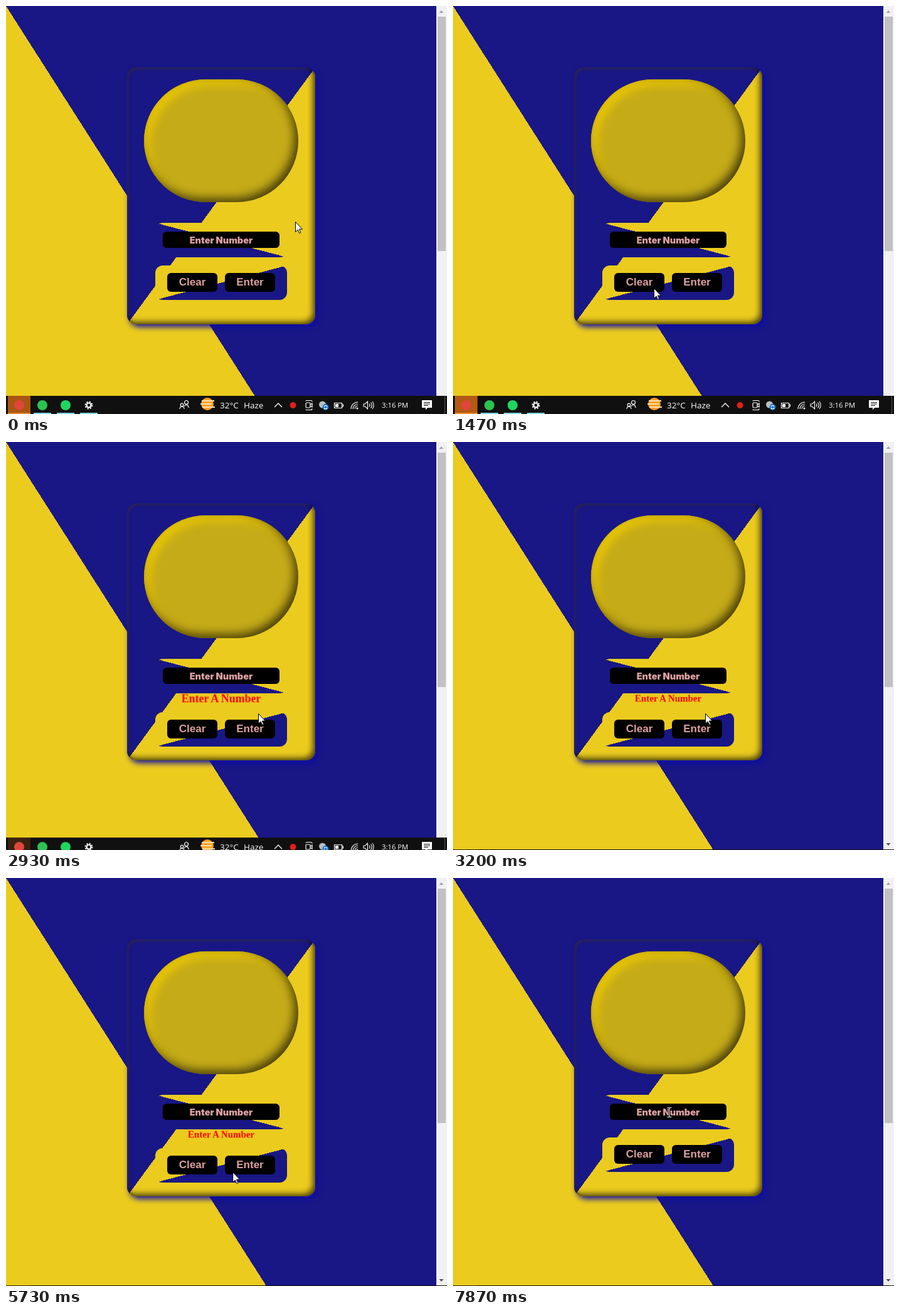
These frames come from a looping animation (703 by 651 pixels, 8000 ms). An HTML page:

```html
<!DOCTYPE html>
<html lang="en">
<head>
<meta charset="utf-8">
<title>Enter Number</title>
<style>
:root { --blue: #191785; --gold: #ebcb1e; --pink: #dda0a0; }
html, body { margin: 0; width: 100%; height: 100%; overflow: hidden; }
body * { position: absolute; box-sizing: border-box; }
svg * { position: static; }
svg { overflow: visible; }
.stage { left: 0; top: 0; width: 703px; height: 651px; overflow: hidden; background: #f1f1f1; }
.page { width: 686px; height: 1076px; background: linear-gradient(to top right, var(--gold) 50%, var(--blue) 50%); }
.thumb { left: 688px; top: 17px; width: 13px; height: 374px; background: #c1c1c1; }
.card {
  left: 193px; top: 98px; width: 300px; height: 410px; border-radius: 15px;
  background: linear-gradient(to bottom right, var(--blue) 50%, var(--gold) 50%);
  box-shadow: 4px 4px 10px #0c0ca8, inset -4px -4px 10px rgba(0, 0, 0, .65), inset 2px 2px 5px rgba(60, 52, 60, .7);
}
.screen {
  left: 27px; top: 19px; width: 246px; height: 196px; border-radius: 98px; background: #c5ab18;
  box-shadow: inset -6px -6px 15px rgba(0, 0, 0, .65), inset 8px 8px 15px #efcb04;
}
.row { left: 45px; width: 210px; height: 55px; border-radius: 12px; }
.entry { top: 248px; background: linear-gradient(to bottom left, var(--gold) 50%, var(--blue) 50%); }
.keys { top: 316px; background: linear-gradient(to bottom right, var(--gold) 50%, var(--blue) 50%); animation: push 8s step-end infinite; }
.box {
  top: 12px; width: 80px; height: 30px; border-radius: 6px; background: #000; color: var(--pink);
  font: bold 17px/29px "Liberation Sans", Arial, sans-serif; text-align: center; white-space: nowrap;
}
.field { left: 12px; top: 14px; width: 186px; height: 26px; font: 900 14.5px/27px Inter, "Liberation Sans", sans-serif; }
.caret { left: 151px; top: 265px; width: 2px; height: 20px; background: var(--pink); animation: blink 8s step-end infinite; }
.error {
  left: 50px; top: 303px; width: 200px; height: 17px; color: #f00; text-align: center;
  font: bold 15px/17px "Liberation Serif", "Times New Roman", serif;
  animation: show 8s step-end infinite, pulse 8s ease-in-out infinite;
}
.bar { left: 0; top: 622px; width: 703px; height: 40px; background: #101010; animation: slide 8s linear infinite; }
.alert { animation: glow 8s linear infinite; }
.mouse { left: 0; top: 0; width: 1px; height: 1px; animation: move 8s linear infinite; }
.arrow { animation: arrow 8s step-end infinite; }
.beam { animation: beam 8s step-end infinite; }

@keyframes push { 0%, 79.95% { transform: none; } 24.875% { transform: translateY(17px); } }
@keyframes show { 0%, 79.95% { opacity: 0; } 24.875% { opacity: 1; } }
@keyframes pulse {
  0%, 24.875%, 32.375%, 39.875%, 100% { transform: scale(1); }
  28.625%, 36.125% { transform: scale(1.2); }
}
@keyframes blink { 0%, 98.3% { opacity: 0; } 91.6% { opacity: 1; } }
@keyframes slide { 0%, 35% { transform: none; } 40%, 100% { transform: translateY(28px); } }
@keyframes glow {
  0% { opacity: .95; } 9% { opacity: .7; } 17%, 21% { opacity: 1; }
  31% { opacity: .65; } 36.6%, 100% { opacity: .25; }
}
@keyframes move {
  0%, .9% { transform: translate(461px, 344px); }
  10.9% { transform: translate(397px, 396px); }
  18.3%, 19.5% { transform: translate(320px, 450px); }
  24.5%, 55.8% { transform: translate(402px, 433px); }
  56.6% { transform: translate(386px, 438px); }
  61.6%, 71% { transform: translate(379px, 469px); }
  72.5%, 74.5% { transform: translate(337px, 469px); }
  77.5%, 80.2% { transform: translate(310px, 469px); }
  88.4%, 100% { transform: translate(345px, 374px); }
}
@keyframes arrow { 0% { opacity: 1; } 87.4%, 100% { opacity: 0; } }
@keyframes beam { 0% { opacity: 0; } 87.4%, 100% { opacity: 1; } }
</style>
</head>
<body>
<div class="stage">
  <div class="page"></div>
  <div class="thumb"></div>
  <svg width="703" height="651">
    <path d="M690.5 11h7l-3.500-4z" fill="#a3a3a3"/>
    <path d="M690.500 640h7l-3.500 4z" fill="#505050"/>
  </svg>

  <div class="card">
    <div class="screen"></div>
    <div class="row entry"><div class="box field">Enter Number</div></div>
    <div class="caret"></div>
    <div class="error">Enter A Number</div>
    <div class="row keys">
      <div class="box" style="left:19px">Clear</div>
      <div class="box" style="left:111px">Enter</div>
    </div>
  </div>

  <div class="bar">
    <svg width="703" height="40" fill="none" stroke="#fff" stroke-width="1.2">
      <g class="alert" stroke="none">
        <path d="M3 0h36v29H3z" fill="#b35a14"/>
        <path d="M3 27h36v2H3z" fill="#f08a24"/>
      </g>
      <g stroke="none">
        <circle cx="21" cy="15" r="8" fill="#e0463a"/>
        <circle cx="58" cy="15" r="8" fill="#2bc351"/>
        <circle cx="95" cy="15" r="8" fill="#1ed760"/>
        <path d="M44 27h28v2h-28zM81 27h28v2h-28zM118 27h28v2h-28z" fill="#7fd6e4"/>
      </g>
      <circle cx="132" cy="15" r="3.500" stroke-width="2.200"/>
      <circle cx="132" cy="15" r="5.500" stroke-width="2" stroke-dasharray="2.160"/>

      <circle cx="287.500" cy="10.500" r="3"/>
      <circle cx="280.500" cy="14.500" r="2.300"/>
      <path d="M277 21c0-5 7-5 7 0M284 17c2-4 7-3 7 2"/>

      <circle cx="321" cy="13" r="10" fill="#f9a01e" stroke="none"/>
      <path d="M312 8h20M310 13h18M313 18h20" stroke="#ffe2b0" stroke-width="2"/>

      <path d="M428 18l6-6 6 6" stroke-width="1.400"/>
      <circle cx="457.500" cy="15" r="5" fill="#e0201c" stroke="none"/>
      <rect x="478" y="11" width="7" height="8" rx="1.500"/>
      <path d="M485 14l3-2v6l-3-2M478 8.500q0-1 1-1h7q2 0 2 2M478 21.500q0 1 1 1h7q2 0 2-2"/>
      <circle cx="504.500" cy="14" r="5.500" fill="#b9bdc2" stroke="none"/>
      <circle cx="509.500" cy="18" r="5" fill="#1673c8" stroke="none"/>
      <path d="M507 17.500a2.600 2.600 0 0 1 5 0M512 19a2.600 2.600 0 0 1-5 0"/>
      <path d="M523.500 11.500h12v8h-12zM536 14h1.500v3H536"/>
      <path d="M525 13h5v5h-5z" fill="#fff" stroke="none"/>
      <path d="M550 21a11 11 0 0 1 11-11M553 21a8 8 0 0 1 8-8M556 21a5 5 0 0 1 5-5" stroke-width="1.100"/>
      <circle cx="560" cy="20" r="1.500" fill="#fff" stroke="none"/>
      <path d="M570 13h2.500l4-4v12l-4-4H570zM579 12.500q2 2.500 0 5M581.500 10.500q3.500 4.500 0 9M584 9q4.500 6 0 12" stroke-width="1.100"/>
      <path d="M663 7h16v12h-7l-3 3.500V19h-6z" fill="#fff" stroke="none"/>
      <path d="M666 10.500h10M666 13h10M666 15.500h7" stroke="#101010"/>
      <path d="M699.500 0v40" stroke="#555" stroke-width="1"/>
      <g fill="#fff" stroke="none" font-family="'Open Sans', 'Noto Sans', sans-serif">
        <text x="341" y="20" font-size="13.500">32°C</text>
        <text x="379" y="20" font-size="13.500">Haze</text>
        <text x="599" y="19" font-size="11.300">3:16 PM</text>
      </g>
    </svg>
  </div>

  <div class="mouse">
    <svg width="1" height="1">
      <path class="arrow" d="M.5.5v16l3.600-3.500 2.500 5.500 2.200-1-2.400-5.400h5z" fill="#fff" stroke="#000"/>
      <g class="beam" fill="none">
        <path d="M-3.500-7.500h2.500q1 0 1 1 0-1 1-1h2.500M0-7v14M-3.500 7.500h2.500q1 0 1-1 0 1 1 1h2.500" stroke="#000" stroke-width="3"/>
        <path d="M-3.500-7.500h2.500q1 0 1 1 0-1 1-1h2.500M0-7v14M-3.500 7.500h2.500q1 0 1-1 0 1 1 1h2.500" stroke="#fff"/>
      </g>
    </svg>
  </div>
</div>
</body>
</html>
```
